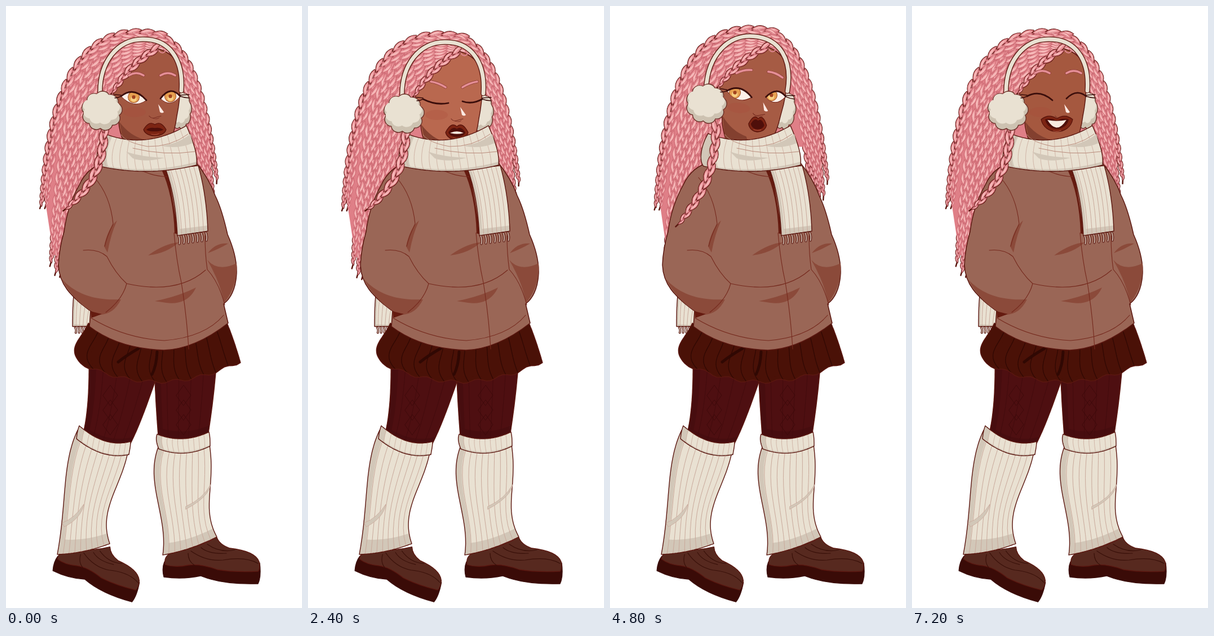
Animation of 525x1067 px, one loop 8000 ms. Source, as an HTML page:

```html
<!DOCTYPE html>
<html lang="en">
<head>
<meta charset="utf-8">
<title>Winter outfit</title>
<style>
html, body { margin: 0; width: 100%; height: 100%; overflow: hidden; background: #fff; }
svg { display: block; width: 100vw; height: 100vh; }
path { stroke-linejoin: round; stroke-linecap: round; }
</style>
</head>
<body>
<svg id="stage" viewBox="0 0 525 1067"></svg>
<script>
const INK = '#5b1710', LASH = '#3b0e0b', CREAM = '#e9e1d2', SHADE = '#d2c7b8', RIB = '#c9a99b';
const COAT = '#9a6656', FOLD = '#8b4a3a', SEAM = '#75291d', TIGHTS = '#4e0f11', SKIRT = '#4a1107';

const path = (d, fill = 'none', stroke = 'none', width = 1.3) =>
  `<path d="${d}" fill="${fill}" stroke="${stroke}" stroke-width="${width}"/>`;
const line = (d, stroke = INK, width = 1.2) => path(d, 'none', stroke, width);
const group = (inner, attrs) => `<g ${attrs}>${inner}</g>`;
const lerp = (a, b, u) => a + (b - a) * u;
const mix = (a, b, u) => a.map((v, i) => lerp(v, b[i], u));
const range = n => Array.from({ length: n }, (_, i) => i);
const trace = points => 'M' + points.map(p => p.map(v => v.toFixed(1)).join(' ')).join('L');

function bezier([x0, y0, x1, y1, x2, y2, x3, y3], t) {
  const s = 1 - t;
  const at = (a, b, c, d) => s*s*s*a + 3*s*s*t*b + 3*s*t*t*c + t*t*t*d;
  const slope = (a, b, c, d) => 3 * (s*s*(b-a) + 2*s*t*(c-b) + t*t*(d-c));
  const dx = slope(x0, x1, x2, x3), dy = slope(y0, y1, y2, y3), speed = Math.hypot(dx, dy);
  return { x: at(x0, x1, x2, x3), y: at(y0, y1, y2, y3), tx: dx / speed, ty: dy / speed, speed };
}

// A plait: leaves on alternate sides of a cubic curve.
function plait(curve, w, fill = '#ec999d') {
  let t = 0, side = 1, leaves = '', shine = '', veins = '';
  while (t < 1) {
    const p = bezier(curve, t), k = w * (1 - 0.6 * t ** 7);
    const at = (n, l) => `${(p.x + (p.tx*l - p.ty*n*side)*k).toFixed(1)} ${(p.y + (p.ty*l + p.tx*n*side)*k).toFixed(1)}`;
    leaves += `M${at(.34, -.9)}Q${at(.85, .1)} ${at(-.1, 1)}Q${at(-.25, -.1)} ${at(.34, -.9)}Z`;
    shine += `M${at(.36, -.5)}Q${at(.6, .1)} ${at(.05, .65)}Q${at(.1, 0)} ${at(.36, -.5)}Z`;
    veins += `M${at(.18, -.5)}Q${at(.16, .1)} ${at(0, .6)}`;
    t += k * .78 / Math.max(p.speed, 60);
    side = -side;
  }
  const end = bezier(curve, 1), tuft = `M${end.x} ${end.y}l${end.tx * 9 - 2} ${end.ty * 9}`;
  return {
    under: path(leaves, INK, INK, 2.2) + line(tuft, INK, 2.5),
    over: path(leaves, fill, '#c4606a', .8) + path(shine, '#f6b8b8') + line(veins, '#d9808a', .6),
  };
}
const singlePlait = (curve, w) => { const p = plait(curve, w); return p.under + p.over; };

function hair() {
  const fan = (outer, inner, n, w, tip) => range(n).map(i => {
    const u = 1 - i / (n - 1), curve = mix(outer, inner, u);
    curve[7] = tip(u);
    return plait(curve, w, i % 3 ? '#ec999d' : '#e88d93');
  });
  const plaits = [
    ...fan([272, 52, 110, 20, 80, 190, 63, 350], [262, 80, 195, 120, 172, 170, 150, 380], 11, 15,
      u => u < .15 ? 350 : 478 - 160 * Math.abs(u - .36)),
    ...fan([262, 52, 334, 60, 354, 190, 374, 306], [275, 72, 316, 90, 328, 200, 346, 340], 5, 12.5,
      u => u ? 333 : 306),
  ];
  const backing = path('M265 55C150 35 85 130 68 335L84 440L100 450L200 250L330 250L362 320C368 210 345 75 265 55Z', '#df7f87');
  return plaits.map(p => p.under).join('') + backing + plaits.map(p => p.over).join('');
}

// Cloth hung between two edge curves; u runs across, v down.
function cloth(left, right, { ribs = 8, sag = [0, 0], fill = CREAM, rib = RIB, shade = SHADE, wave = 0, ribWidth = 1 } = {}) {
  const at = (u, v) => {
    const a = bezier(left, v), b = bezier(right, v);
    return [lerp(a.x, b.x, u), lerp(a.y, b.y, u) + lerp(...sag, v) * 4 * u * (1 - u) + wave * v * Math.sin(u * 40)];
  };
  const steps = range(41).map(i => i / 40), back = [...steps].reverse();
  const patch = (u0, u1, v0, v1) => trace([
    ...steps.map(s => at(u0, lerp(v0, v1, s))), ...steps.map(s => at(lerp(u0, u1, s), v1)),
    ...back.map(s => at(u1, lerp(v0, v1, s))), ...back.map(s => at(lerp(u0, u1, s), v0))]) + 'Z';
  const ribLines = range(ribs - 1).map(i => trace(range(13).map(j => at((i + 1) / ribs, j / 12)))).join('');
  return path(patch(0, 1, 0, 1), fill) + path(patch(0, .1, 0, 1), shade) + path(patch(0, 1, .9, 1), shade) +
    line(ribLines, rib, ribWidth) + line(patch(0, 1, 0, 1), INK, 1.4);
}
function fringe(x0, y0, x1, y1, n, len) {
  const d = range(n).map(i => `M${lerp(x0, x1, (i + .3) / n)} ${lerp(y0, y1, (i + .3) / n)}q3 ${len / 2} 1 ${len}`).join('');
  return line(d, INK, 4) + line(d, '#d9cbbc', 1.6);
}

function legs() {
  const style = { fill: TIGHTS, rib: '#430b0d', shade: '#470d0f', ribs: 5 };
  const diamonds = x => line(range(3).map(i => `M${x} ${690 + i * 26}l13 -18l13 18l-13 18Z`).join(''), '#3d090b', .9);
  return cloth([147, 610, 148, 670, 146, 720, 137, 757], [285, 610, 268, 650, 245, 730, 219, 779], { ...style, sag: [0, 12] }) +
    cloth([262, 610, 264, 670, 266, 710, 270, 762], [375, 610, 371, 670, 366, 710, 359, 757], { ...style, sag: [0, 10] }) +
    diamonds(172) + diamonds(302);
}

function shoe(transform) {
  return group(
    path('M1 0Q-4 12 0 27Q33 32 65 25Q105 41 167 39Q173 27 170 2Z', '#3a0b07', LASH) +
    path('M2 5Q0 -11 13 -15Q60 -25 94 -43Q99 -30 117 -24Q162 -19 169 0Q171 13 167 17Q125 19 95 14Q65 3 43 6Q20 11 2 5Z', '#57291f', INK) +
    line('M43 -15Q43 -1 54 6M48 -19Q75 0 105 -3Q145 -10 167 3M66 -25Q80 -13 111 -15M77 -31Q100 -15 126 -21', '#391009'),
    `transform="${transform}"`);
}

function warmers() {
  const cuff = { ribs: 10, ribWidth: .8 };
  return cloth([127, 752, 99, 810, 108, 880, 91, 972], [218, 780, 208, 850, 162, 890, 184, 953], { ribs: 9, sag: [10, 4] }) +
    cloth([130, 744, 127, 751, 126, 758, 125, 767], [221, 772, 221, 780, 219, 788, 218, 795], { ...cuff, sag: [13, 12] }) +
    cloth([270, 782, 246, 845, 288, 905, 278, 973], [361, 778, 372, 850, 346, 890, 374, 941], { ribs: 9, sag: [10, 4] }) +
    cloth([268, 759, 265, 767, 267, 775, 271, 785], [360, 755, 362, 763, 362, 772, 362, 780], { ...cuff, sag: [10, 10] }) +
    path('M319 887Q350 873 363 848Q360 870 319 892ZM100 916Q122 908 138 883Q134 907 104 923Z', SHADE, RIB, .8);
}

const skirt = () => cloth([146, 562, 135, 590, 105, 605, 133, 634], [392, 562, 402, 585, 410, 610, 416, 630],
  { ribs: 13, sag: [40, 34], fill: SKIRT, rib: '#300803', shade: SKIRT, wave: 3, ribWidth: 1.3 }) +
  line('M235 607Q214 619 199 631M268 613Q267 637 259 653', '#300803', 5);

function coat() {
  return path('M150 540L148 568Q199 607 280 610Q335 608 394 562L386 528Q407 512 409 474Q410 443 393 405Q383 360 371 336Q361 307 337 277L180 276Q145 284 130 317Q109 354 103 400Q94 431 93 459Q94 483 108 502Q125 525 161 548Z', COAT, INK, 1.5) +
    path('M99 484Q135 524 204 520Q190 549 162 547Q122 527 99 484ZM357 450Q376 472 409 456Q412 494 387 526Q380 490 357 450Z', FOLD) +
    path('M252 442Q281 421 306 419Q286 438 252 442ZM264 523Q305 515 337 499Q322 531 284 526ZM358 438Q372 419 394 421Q377 431 358 438ZM174 426Q180 395 197 380Q186 404 180 437Z', FOLD) +
    path('M150 541L170 546L151 553ZM275 288L287 292L306 405L299 403Q297 335 275 288Z', '#651b10') +
    line('M157 304Q185 336 190 386Q179 408 175 426M137 433Q163 430 179 444Q194 474 214 492Q207 520 177 543M214 492Q304 512 354 468M353 407Q353 440 357 467Q378 490 388 530M151 553Q210 589 281 593Q353 587 386 548M235 289Q282 314 336 293M298 402Q302 450 311 490Q321 553 324 608', SEAM, 1.1);
}

const backTail = () => cloth([120, 513, 118, 535, 118, 555, 118, 568], [154, 543, 151, 553, 150, 560, 149, 568], { ribs: 5 }) +
  fringe(121, 570, 156, 569, 6, 9);
const scarf = () =>
  cloth([283, 289, 298, 330, 302, 370, 304, 407], [341, 283, 353, 325, 357, 367, 358, 399], { ribs: 7 }) +
  fringe(304, 408, 360, 401, 7, 14) +
  cloth([174, 226, 160, 250, 158, 275, 166, 284], [320, 212, 332, 240, 340, 262, 338, 282], { ribs: 13, sag: [18, 10], ribWidth: .8 }) +
  path('M213 258Q236 267 281 269Q246 278 225 270ZM275 248Q306 244 327 227L331 243Q306 254 275 248Z', SHADE) +
  line('M204 228Q213 242 251 249Q292 250 323 227M225 252Q282 266 335 258', '#b98b7b', 1);

function cloud(cx, cy, rx, ry, fill, stroke) {
  const rim = range(10).map(i => i / 9 * Math.PI * 2 + .25)
    .map(a => `${cx + rx * Math.cos(a)} ${cy + ry * Math.sin(a)}`);
  return path('M' + rim.join(`A${rx * .4} ${ry * .4} 0 0 1 `) + 'Z', fill, stroke, 1.4);
}
const muff = (cx, cy, rx, ry) => cloud(cx, cy, rx, ry, '#cdc2b1', '#6b3028') + cloud(cx - 1, cy - 5, rx * .92, ry * .83, CREAM);

const face = skin => muff(309, 184, 18, 31) +
  path('M262 74Q294 80 306 105Q313 145 303 195Q300 220 290 245L210 245Q200 220 200 205L190 150Q213 120 262 74Z', skin, INK, 1.4) +
  path('M201 205Q219 230 246 237L250 246L209 245Z', '#83402f') +
  '<ellipse cx="228" cy="188" rx="20" ry="9" fill="#a64938" opacity=".25"/>' +
  line('M258 80q8 -7 14 0t12 -2t10 8', '#dc858c', 2) +
  singlePlait([266, 76, 240, 92, 215, 112, 190, 152], 13);
function headband() {
  const arc = 'M167 160C164 98 199 59 242 59C289 58 315 94 311 150';
  return line(arc, INK, 9.5) + line(arc, CREAM, 6.8) + muff(170, 186, 32, 31);
}

// Features sit at rest in head space and are moved by each mood.
const brows = ({ lift = 0, tilt = 0 }) => [[231, 1], [287, -1]].map(([x, inward]) => {
  const y = 123 - lift, slant = tilt * inward;
  const d = `M${x - 13} ${y - slant}Q${x} ${y - 8 + Math.abs(tilt)} ${x + 13} ${y + slant}`;
  return line(d, '#8d3a37', 5) + line(d, '#e58f96', 3.7);
}).join('');

const nose = () => path('M270 174L280 188Q277 191 273 188Z', '#fdeae3') +
  path('M256 197q9 5 17 0q-5 7 -17 0Z', '#833629') + line('M254 195q4 5 10 3t11 -3', '#7a3023');

function mouth({ w = 20, h = 11, open = .3, smile = 0, teeth = 0, rise = 0 }) {
  const x = 264 - smile * .7, y = 219 - rise, corner = y - smile;
  const lips = (a, top, low) => `M${x - a} ${corner}Q${x - a * .5} ${y - top * 1.5} ${x} ${y - top * .8}` +
    `Q${x + a * .5} ${y - top * 1.5} ${x + a} ${corner}C${x + a * .8} ${y + low * 1.35} ${x - a * .8} ${y + low * 1.35} ${x - a} ${corner}Z`;
  const inner = lips(w * .75, h * open, h * open);
  const bite = `M${x - w * .6} ${corner + 1}Q${x} ${y - h * open * .6} ${x + w * .6} ${corner + 1}Q${x} ${y + h * open * teeth * 2} ${x - w * .6} ${corner + 1}Z`;
  return path(lips(w, h, h), '#7c2413', '#541109', 1.2) + path(inner, '#4f0f0a') +
    (teeth ? path(bite, '#f8eae0') : '') + line(`M${x - 6} ${y + h * .75}q7 2 13 -1`, '#a64a37', 1.3);
}

let clipCount = 0;
function eye(x0, y0, x1, y1, wing, { open = 1, gaze = 0, iris = 9.5, bow = 0 }) {
  const m = (x0 + x1) / 2, y = (y0 + y1) / 2, id = `eye${clipCount++}`;
  const lid = `M${x0} ${y0}Q${m} ${y - 22 * open - bow} ${x1} ${y1}`;
  const shape = `${lid}Q${m} ${y + 20} ${x0} ${y0}Z`;
  const [ox, oy] = wing < m ? [x0, y0] : [x1, y1];
  const ball = (r, fill, dy = 0) => `<circle cx="${m + gaze}" cy="${y - 2 + dy}" r="${r}" fill="${fill}"/>`;
  const white = !open ? '' : `<clipPath id="${id}"><path d="${shape}"/></clipPath>` +
    path(shape, '#fdf0e9', '#76281f', 1) + group(ball(iris + 1, '#9c4a22') + ball(iris, '#e7a050') +
      ball(iris * .55, '#f7cf83', 3) + ball(iris * .34, '#a2431f'), `clip-path="url(#${id})"`);
  return white + line(lid, LASH, 2.8) +
    line(`M${ox} ${oy}Q${(ox + wing) / 2} ${oy + 3} ${wing} ${oy + 3}M${ox} ${oy - 2}L${wing} ${oy - 3}`, LASH, 1.5);
}
const eyes = mood => eye(204, 160, 249, 167, 193, mood) + eye(274, 164, 309, 160, 325, mood);

const DARK = '#a25741', WARM = '#b9684f';
const moods = [
  { at: 0, skin: DARK },
  { at: 1200, skin: WARM, hair: 'translate(-2 -3)', head: 'translate(2 0) rotate(-4 240 150)', lift: 2, gaze: -9, open: .8 },
  { at: 2400, skin: WARM, hair: 'translate(0 4)', head: 'translate(0 5)', lift: -11, tilt: 5, open: 0, bow: -8, h: 13, open2: .6, teeth: .3 },
  { at: 3600, skin: DARK, lift: 15, iris: 7, gaze: -6, w: 17, h: 14, teeth: .4 },
  { at: 4800, skin: '#a65b44', hair: 'translate(20 -7) scale(.978 1.026)', head: 'translate(4 -6) rotate(5.5 240 150)',
    swing: [14, 27], tilt: -4, gaze: -8, open: .9, w: 16, h: 13, open2: .65, rise: 5 },
  { at: 6000, skin: '#9b523d', hair: 'translate(12 7.5) scale(.99 1.012)', head: 'translate(11 17) scale(1 .94)',
    swing: [10, 22], drop: 13, tilt: -5, gaze: 13, open: .4, w: 18 },
  { at: 7200, skin: '#a5583f', lift: 4, open: 0, bow: 16, w: 28, h: 14, open2: .65, smile: 10, teeth: 1, rise: 8 },
];

const headLayer = (mood, inner) => group(inner, `transform="${mood.head || ''}"`);
const features = (mood, inner) => group(inner, `transform="translate(0 ${mood.drop || 0})"`);
const lower = m => headLayer(m, face(m.skin) + features(m, brows(m) + nose() + mouth({ ...m, open: m.open2 })));
const upper = m => {
  const [dx, dy] = m.swing || [0, 0];
  return singlePlait([174 + dx, 212, 174 + dx, 286 + dy / 3, 148 + dx, 322 + dy / 2, 110 + dx, 357 + dy], 15) +
    headLayer(m, headband() + features(m, eyes(m)));
};
const layer = draw => moods.map(m => group(draw(m), 'class="mood" display="none"')).join('');

document.getElementById('stage').innerHTML =
  `<defs><g id="hair">${hair()}</g></defs>` +
  layer(m => `<use href="#hair" transform="${m.hair || ''}"/>`) +
  backTail() + legs() + shoe('translate(91 975) rotate(17) scale(.9 1)') + shoe('translate(280 985)') +
  warmers() + skirt() + coat() + layer(lower) + scarf() + layer(upper);

const parts = [...document.querySelectorAll('.mood')];
let shown = -1;
function render() {
  const time = performance.now() % 8000;
  const now = moods.findLastIndex(m => m.at <= time);
  if (now !== shown) {
    parts.forEach((el, i) => el.setAttribute('display', i % moods.length === now ? 'inline' : 'none'));
    shown = now;
  }
  requestAnimationFrame(render);
}
render();
</script>
</body>
</html>
```
